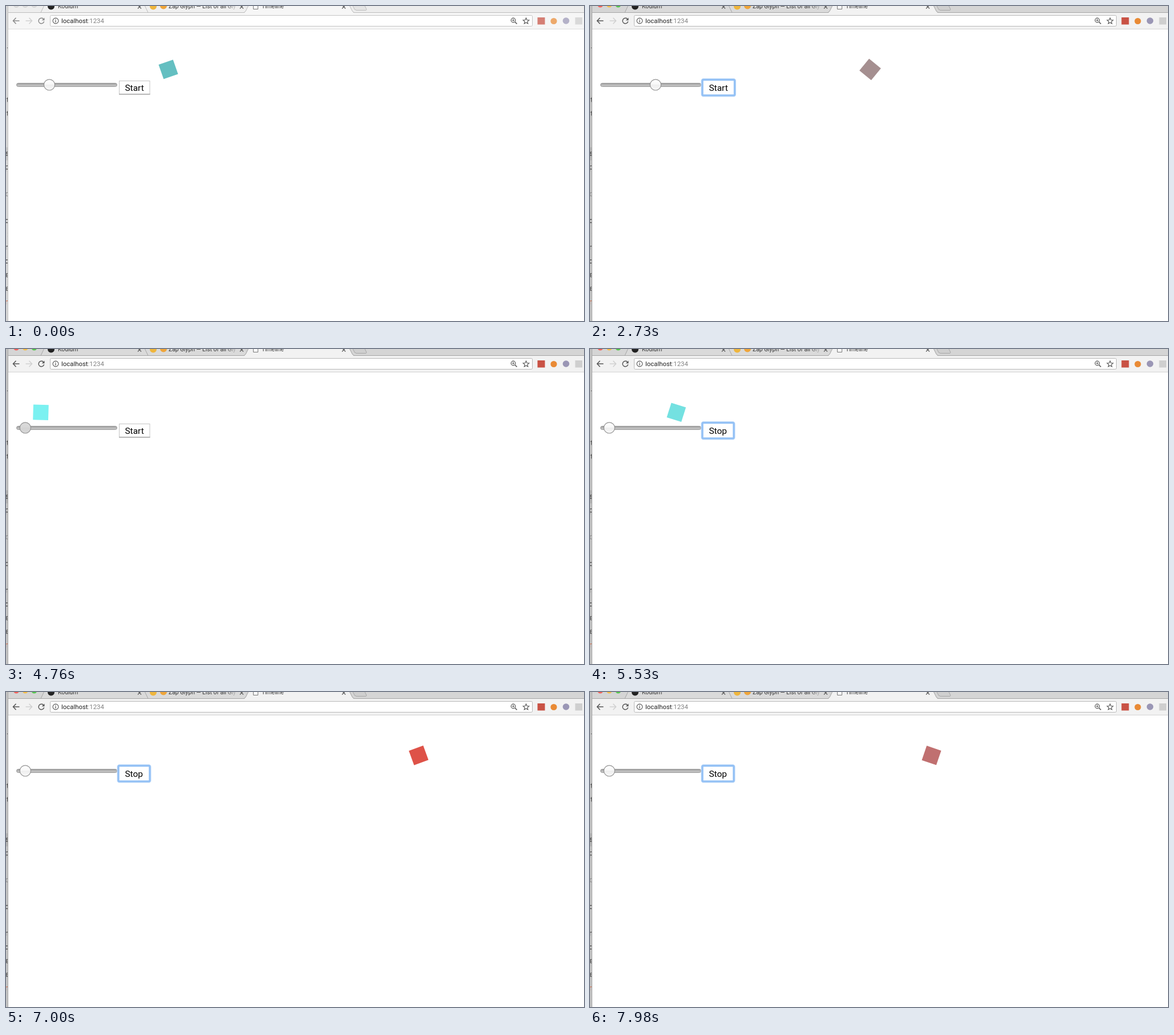
An HTML page with a canvas for the animation above (8 s loop, 1013 by 553 pixels).

```html
<!DOCTYPE html>
<html lang="en">
<head>
<meta charset="utf-8">
<title>Timeline</title>
<style>
html, body { margin: 0; width: 100%; height: 100%; overflow: hidden; background: #fff; }
canvas { display: block; width: 1013px; height: 553px; }
</style>
</head>
<body>
<canvas id="stage" width="1013" height="553"></canvas>
<script>
const ctx = document.getElementById('stage').getContext('2d');
const LOOP = 8000, STEP = 70;
const WAKE = 1050, PLAY = 2170, PAUSE = 2700, GRAB = 3570, DROP = 4900, PRESS = 5180, REPLAY = 5300;
const TRACK_START = 20, TRACK_LENGTH = 844;

// [time, x centre of the moving box]
const path = [[0, 284.5], [PLAY, 284.5], [PAUSE, 491], [3640, 491], [4060, 193.7], [4340, 108],
  [4690, 61], [REPLAY, 61], [5530, 151.3], [7000, 723.2], [7340, 864], [7980, 598.5]];
// [x, red, green, blue]
const tint = [[20, 126, 249, 249], [151, 116, 225, 225], [194, 111, 216, 216], [284, 100, 191, 193],
  [491, 165, 143, 144], [598, 192, 112, 112], [723, 222, 82, 72], [864, 250, 48, 38]];

function sample(keys, at) {
  let i = 1;
  while (i < keys.length - 1 && keys[i][0] < at) i++;
  const a = keys[i - 1], b = keys[i];
  const k = Math.max(0, Math.min(1, (at - a[0]) / (b[0] - a[0])));
  return a.slice(1).map((v, n) => v + (b[n + 1] - v) * k);
}

const easeInOut = p => p < 0.5 ? 2 * p * p : 1 - 2 * (1 - p) ** 2;
const positionAt = t => sample(path, t)[0];

function rect(x, y, w, h, fill) {
  ctx.fillStyle = fill;
  ctx.fillRect(x, y, w, h);
}

function circle(x, y, r, fill, stroke, width = 1) {
  ctx.beginPath();
  ctx.arc(x, y, r, 0, Math.PI * 2);
  if (fill) { ctx.fillStyle = fill; ctx.fill(); }
  if (stroke) { ctx.strokeStyle = stroke; ctx.lineWidth = width; ctx.stroke(); }
}

function poly(points, fill, stroke, width = 1, close = false) {
  ctx.beginPath();
  points.forEach(([x, y]) => ctx.lineTo(x, y));
  if (close) ctx.closePath();
  if (fill) { ctx.fillStyle = fill; ctx.fill(); }
  if (stroke) { ctx.strokeStyle = stroke; ctx.lineWidth = width; ctx.stroke(); }
}

function round(x, y, w, h, r, fill, stroke, width = 1) {
  ctx.beginPath();
  ctx.roundRect(x, y, w, h, r);
  if (fill) { ctx.fillStyle = fill; ctx.fill(); }
  if (stroke) { ctx.strokeStyle = stroke; ctx.lineWidth = width; ctx.stroke(); }
}

function label(text, x, y, size, fill, family = 'Roboto, sans-serif') {
  ctx.font = `${size}px ${family}`;
  ctx.fillStyle = fill;
  ctx.fillText(text, x, y);
}

function cross(x, y) {
  poly([[x - 3, y - 3], [x + 3, y + 3]], null, '#555', 1.2);
  poly([[x + 3, y - 3], [x - 3, y + 3]], null, '#555', 1.2);
}

function drawEditorEdge(awake) {
  rect(0, 0, 5, 553, awake ? '#c3c3c3' : '#d6d6d6');
  rect(0, 248, 4, 23, awake ? '#b2b2b2' : '#c5c5c5');
  ctx.save();
  ctx.beginPath();
  ctx.rect(0, 0, 4, 553);
  ctx.clip();
  ctx.textAlign = 'right';
  const lines = { 77: '-', 169: 't', 193: 't', 263: 's', 287: 'p', 334: 'c', 381: 'o',
    405: ':', 428: 'n', 452: 'd', 476: 'e', 500: 'e', 524: 'n' };
  for (const y in lines) {
    const fill = y === '524' ? '#d0603a' : y === '334' || y === '405' ? '#888' : '#333';
    label(lines[y], 5, +y, 12, fill, 'Roboto, sans-serif');
  }
  ctx.restore();
  rect(3, 0, 1, 553, awake ? '#aaa' : '#c6c6c6');
}

function drawTabs(awake) {
  const bar = awake ? '#d5d5d5' : '#ededed';
  const tab = awake ? '#dadada' : '#f0f0f0';
  const line = awake ? '#a6a6a6' : '#bcbcbc';
  rect(4, 0, 1009, 12, bar);
  ['#f4605a', '#f7be46', '#54c84c'].forEach((fill, i) =>
    circle(18 + i * 15.7, -2.8, 5.2, awake ? fill : '#dddddd', awake ? null : '#cfcfcf'));

  poly([[61, 12], [67, 0], [418, 0], [424, 12]], tab);
  poly([[61, 11.5], [66.5, 0]], null, line);
  poly([[243.5, 0], [249, 11.5]], null, line);
  rect(4, 11, 1009, 1, line);
  poly([[417, 12.5], [420, 10], [425, 0], [602, 0], [607, 10], [610, 12.5]], awake ? '#f2f2f2' : '#f6f6f6');
  poly([[417, 11.5], [420, 9], [424.5, 0]], null, line);
  poly([[602.5, 0], [607, 9], [610, 11.5]], null, line);
  poly([[608, 0], [611, 6], [614, 7.5], [631, 7.5], [632, 6], [629, 0]], awake ? '#cfcfcf' : '#e4e4e4', line);

  circle(79, 0.5, 6, '#222');
  label('Kodlum', 91, 4.4, 10.3, '#333');
  circle(258, 0.5, 6, '#efb63d');
  circle(276, -0.5, 6, '#efa53a');
  const fade = ctx.createLinearGradient(385, 0, 406, 0);
  fade.addColorStop(0, '#333');
  fade.addColorStop(1, 'rgba(51,51,51,0)');
  label('Zap Glyph — List of all Gly', 285, 4.4, 10.3, fade);
  label('Timeline', 448, 4.4, 10.2, '#333');
  poly([[433.5, -3], [433.5, 5.5], [441.5, 5.5], [441.5, -3]], '#fff', '#777');
  [234, 413, 592].forEach(x => cross(x, 1.5));
}

function drawIcons(awake) {
  const ink = awake ? '#555' : '#888';
  const arrow = (x, dir, color) => {
    poly([[x - 5.5, 26], [x + 5.5, 26]], null, color, 1.5);
    poly([[x + dir * 0.5, 20.7], [x + dir * 5.5, 26], [x + dir * 0.5, 31.3]], null, color, 1.5);
  };
  arrow(18, -1, ink);
  arrow(40, 1, '#d0d0d0');
  ctx.beginPath();
  ctx.arc(62, 26, 4.8, 0.25, Math.PI * 1.75);
  ctx.strokeStyle = ink;
  ctx.lineWidth = 1.5;
  ctx.stroke();
  poly([[67.5, 20.5], [67.5, 25.3], [62.8, 25.3]], ink);

  circle(87, 26, 4.9, null, '#555', 1.1);
  rect(86.4, 25, 1.2, 3.8, '#555');
  rect(86.4, 23, 1.2, 1.2, '#555');

  circle(889, 25, 3.8, null, '#555', 1.2);
  poly([[892, 28], [895.5, 31.5]], null, '#555', 1.6);
  poly([[887, 25], [891, 25]], null, '#555', 1);
  poly([[889, 23], [889, 27]], null, '#555', 1);
  const star = Array.from({ length: 10 }, (_, i) => {
    const a = -Math.PI / 2 + i * Math.PI / 5, r = i % 2 ? 2.5 : 5.6;
    return [911.5 + r * Math.cos(a), 26.5 + r * Math.sin(a)];
  });
  poly(star, null, '#555', 1.1, true);

  ctx.globalAlpha = awake ? 1 : 0.72;
  rect(931.5, 20, 13, 12.5, '#c95245');
  circle(960, 26.5, 5.6, '#e98a35');
  circle(981.5, 26, 5.8, '#9a96b5');
  rect(997.5, 20, 12.5, 12.5, '#cfcfcf');
  ctx.globalAlpha = 1;
}

function drawToolbar(awake) {
  rect(4, 12, 1009, 28, awake ? '#f2f2f2' : '#f6f6f6');
  rect(4, 40, 1009, 1, awake ? '#d2d2d2' : '#dedede');
  round(77.5, 16.5, 845, 19, 2, '#fff', awake ? '#b8b8b8' : '#c4c4c4');
  label('localhost', 97, 30, 11.4, '#222');
  label(':1234', 143.5, 30, 11.4, '#808080');
  drawIcons(awake);
}

function drawSlider(x, held) {
  const groove = ctx.createLinearGradient(0, 135, 0, 142);
  groove.addColorStop(0, '#929292');
  groove.addColorStop(0.4, '#b4b4b4');
  groove.addColorStop(1, '#cccccc');
  round(18.5, 135.5, 176, 6, 3, groove, '#989898');
  const knob = ctx.createLinearGradient(0, 128, 0, 148);
  knob.addColorStop(0, held ? '#dadada' : '#ffffff');
  knob.addColorStop(0.5, held ? '#d7d7d7' : '#f8f8f8');
  knob.addColorStop(0.51, held ? '#d3d3d3' : '#efefef');
  knob.addColorStop(1, held ? '#d6d6d6' : '#f7f7f7');
  circle(x, 138.4, 9.6, knob, '#919191', 1.2);
}

function drawButton(text, focused) {
  const width = text === 'Stop' ? 53 : 54.5;
  if (focused) {
    round(195.2, 127.7, width + 5.6, 31, 3.5, null, '#c9e0fa', 1.5);
    round(197, 129.5, width + 2, 27.4, 2, '#fff', '#94c1f5', 3.4);
  } else {
    rect(198, 131, width, 24.5, '#c4c4c4');
    rect(198, 154, width, 1.5, '#aaaaaa');
    rect(199, 132, width - 2, 22, '#fff');
  }
  label(text, 208.4, 149, 15.5, '#000');
}

function drawBox(x) {
  const [r, g, b] = sample(tint, x);
  ctx.save();
  ctx.translate(x, 111.3);
  ctx.rotate(easeInOut((x - TRACK_START) / TRACK_LENGTH) * Math.PI * 2);
  rect(-13.4, -13.4, 26.8, 26.8, `rgb(${r},${g},${b})`);
  ctx.restore();
}

function draw(t) {
  const awake = t >= WAKE;
  const playing = (t >= PLAY && t < PAUSE) || t >= REPLAY;
  const focused = (t >= 2030 && t < GRAB) || t >= PRESS;
  const x = positionAt(t);
  // The slider rests while the box plays on its own.
  const sliderX = playing ? positionAt(t < PAUSE ? PLAY : REPLAY) : x;

  ctx.textAlign = 'left';
  rect(0, 0, 1013, 553, '#fff');
  drawEditorEdge(awake);
  rect(4, 41, 1009, 512, '#fff');
  drawTabs(awake);
  drawToolbar(awake);
  drawSlider(76 + (sliderX - 284.5) / 5.3, t >= GRAB && t < DROP);
  drawButton(playing ? 'Stop' : 'Start', focused);
  drawBox(x);
}

const start = performance.now();
function tick() {
  const t = (performance.now() - start) % LOOP;
  draw(Math.floor(t / STEP) * STEP);
  requestAnimationFrame(tick);
}
tick();
</script>
</body>
</html>
```
